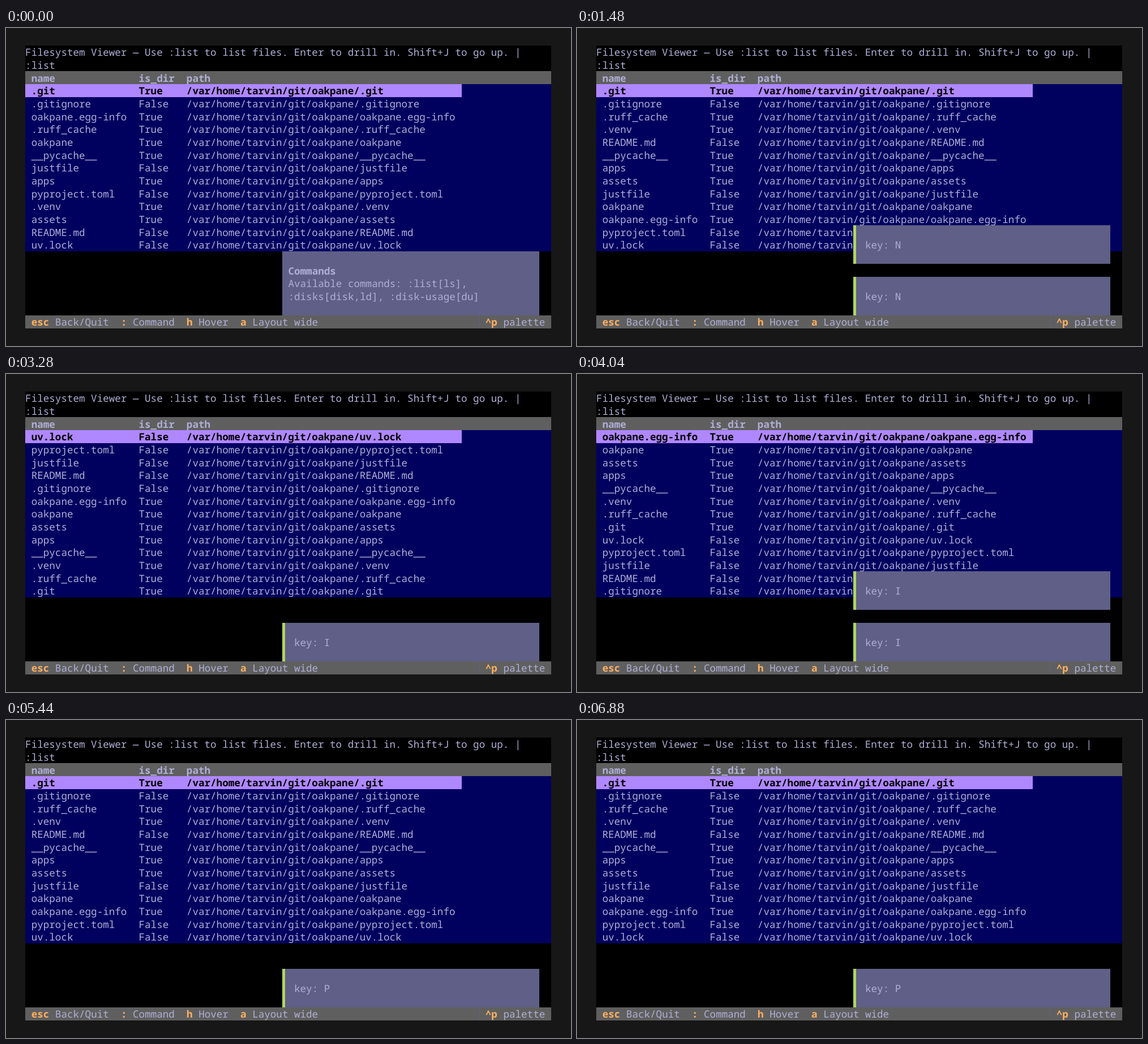
Recreate the animation shown at these times as an HTML page. Size 998x561 px, loop 6.92 s.

```html
<!DOCTYPE html>
<html lang="en">
<head>
<meta charset="utf-8">
<title>Filesystem Viewer</title>
<style>
  html, body { margin: 0; width: 100%; height: 100%; overflow: hidden; background: #171717; }
  svg { display: block; width: 998px; height: 561px; }
  rect { shape-rendering: crispEdges; }
  text {
    font: 17.59px "Noto Sans Mono", "DejaVu Sans Mono", monospace;
    fill: #afafd7;
    white-space: pre;
    text-rendering: geometricPrecision;
  }
  .bold { font-weight: 700; }
  .key { font-weight: 700; fill: #ffaf5f; }
  .cursor { font-weight: 700; fill: #000; }
</style>
</head>
<body>
<svg id="stage" viewBox="0 0 998 561"></svg>
<script>
const LOOP = 6920;
const LEFT = 34.1, TOP = 31, CELL = 10.554, LINE = 22.675, BASE = 18.2;
const ROOT = "/var/home/tarvin/git/oakpane/";

const entries = [
  [".git", 1], [".gitignore", 0], ["oakpane.egg-info", 1], [".ruff_cache", 1],
  ["oakpane", 1], ["__pycache__", 1], ["justfile", 0], ["apps", 1],
  ["pyproject.toml", 0], [".venv", 1], ["assets", 1], ["README.md", 0], ["uv.lock", 0],
].map(([name, dir]) => ({ name, dir }));

// Key press time, key, and how long before it the older toast has gone.
const presses = [
  [40, "N", 0], [400, "N", 0], [760, "N", 40], [1120, "N", 40], [1480, "N", 40], [1840, "N", 40],
  [2200, "I", 40], [2560, "I", 40], [2960, "I", 40], [3320, "I", 40], [3680, "I", 40], [4040, "I", 0],
  [4400, "P", 0], [4760, "P", 40], [5120, "P", 40], [5520, "P", 80], [5840, "P", 0], [6200, "P", 0],
  [6560, "P", 40], [LOOP, "", 40],
].map(([time, key, gap]) => ({ time, key, gap }));

const byName = (a, b) => (a.name < b.name ? -1 : 1);
const byDir = (a, b) => a.dir - b.dir;

// Every press sorts the current order; repeating a key flips the direction.
function buildOrders() {
  const orders = [entries];
  let last = "", sign = 1;
  for (const { key } of presses.slice(0, -1)) {
    sign = key === last ? -sign : 1;
    last = key;
    const compare = key === "I" ? byDir : byName;
    const flip = sign;
    orders.push([...orders.at(-1)].sort((a, b) => flip * compare(a, b)));
  }
  return orders;
}

const colX = col => (LEFT + col * CELL).toFixed(2);
const rowY = row => (TOP + row * LINE).toFixed(2);

function box(col, row, cols, rows, fill) {
  return `<rect x="${colX(col)}" y="${rowY(row)}" width="${(cols * CELL).toFixed(2)}" ` +
    `height="${(rows * LINE).toFixed(2)}" fill="${fill}"/>`;
}

function label(col, row, text, style = "") {
  const y = (TOP + row * LINE + BASE).toFixed(2);
  return `<text x="${colX(col)}" y="${y}" class="${style}">${text}</text>`;
}

const record = (name, dir, path) => name.padEnd(18) + dir.padEnd(8) + path;

function frame() {
  const hints = [[1, "esc", 5, "Back/Quit"], [16, ":", 18, "Command"], [27, "h", 29, "Hover"],
    [36, "a", 38, "Layout wide"], [77, "^p", 80, "palette"]];
  return box(0, 0, 88, 22, "#000") +
    label(0, 0, "Filesystem Viewer — Use :list to list files. Enter to drill in. Shift+J to go up. |") +
    label(0, 1, ":list") +
    box(0, 2, 88, 1, "#5f5f5f") +
    label(1, 2, record("name", "is_dir", "path"), "bold") +
    box(0, 3, 88, 13, "#00005f") +
    box(0, 3, 73, 1, "#af87ff") +
    box(0, 21, 88, 1, "#5f5f5f") +
    box(76, 21, 0.1, 1, "#5f5f87") +
    hints.map(([a, key, b, text]) => label(a, 21, key, "key") + label(b, 21, text)).join("");
}

function table(order) {
  return order.map(({ name, dir }, i) =>
    label(1, 3 + i, record(name, dir ? "True" : "False", ROOT + name), i ? "" : "cursor")).join("");
}

function help() {
  return box(43, 16, 43, 5, "#5f5f87") +
    label(44, 17, "Commands", "bold") +
    label(44, 18, "Available commands: :list[ls],") +
    label(44, 19, ":disks[disk,ld], :disk-usage[du]");
}

function toast(row, key) {
  return box(43, row, 43, 3, "#5f5f87") +
    box(43, row, 0.5, 3, "#afd75f") +
    label(45, row + 1, "key: " + key);
}

const stage = document.getElementById("stage");
stage.innerHTML = frame() + "<g></g><g></g>";
const [tableLayer, popupLayer] = stage.querySelectorAll("g");
const orders = buildOrders();
let shown = "";

function draw(t) {
  const next = presses.findIndex(p => t < p.time);
  const stacked = next > 1 && t < presses[next].time - presses[next].gap;
  const state = next + "/" + stacked;
  if (state === shown) return;
  shown = state;
  tableLayer.innerHTML = table(orders[next]);
  popupLayer.innerHTML = next === 0 ? help() :
    toast(18, presses[next - 1].key) + (stacked ? toast(14, presses[next - 2].key) : "");
}

const start = performance.now();
function tick() {
  draw((performance.now() - start) % LOOP);
  requestAnimationFrame(tick);
}
tick();
</script>
</body>
</html>
```
